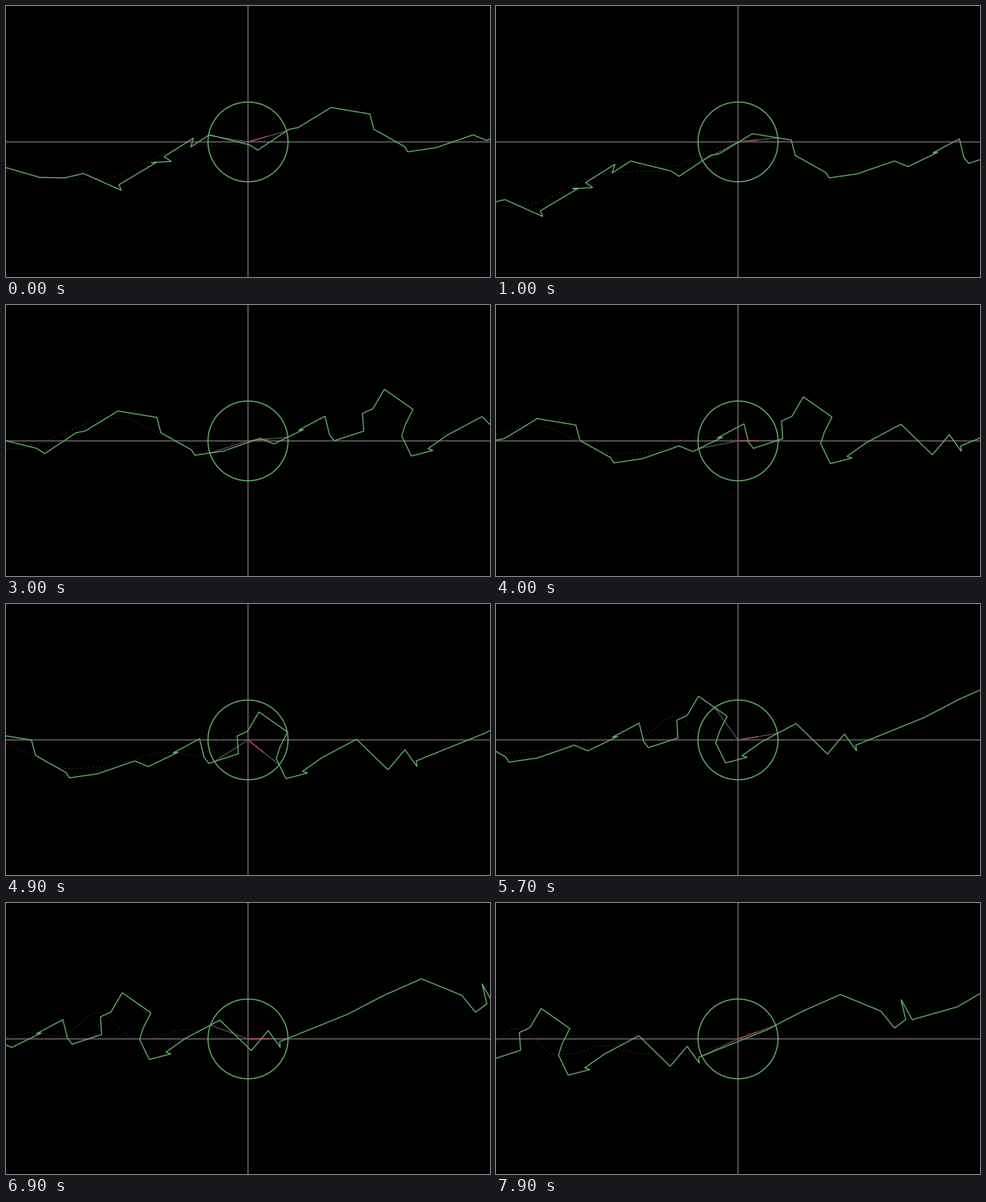
A matplotlib script that plays this animation: 600 by 337 pixels, repeating every 8000 ms.

```python
import numpy as np
import matplotlib.pyplot as plt
from matplotlib.animation import FuncAnimation

W, H, DPI = 600, 337, 100
FRAMES, STEP_MS = 80, 100
DOTS_PER_FRAME, HISTORY = 2, 38
CX, CY, R = 300, 169, 49.6
PX = 72 / DPI
GREEN, AXIS, RAY, RED, DOT = "#66b26c", "#7a747a", "#626262", "#b84c58", "#50303a"

# Corners of the jagged route, in world space
ROUTE = np.array([
    (-30, 192), (42, 213), (73, 213.5), (96, 208), (143, 229), (140, 222),
    (187, 194), (180, 194.5), (205, 193), (196, 187), (232.5, 164), (229, 175),
    (252, 160), (302, 172.5), (312, 179), (351, 153), (362, 151), (403, 126),
    (451, 134), (456, 153), (494, 174.5), (498, 181), (533, 176), (579, 160),
    (596, 167), (633, 149), (626.5, 150), (659.5, 132.5), (665, 155.5),
    (671, 163), (707.5, 151), (706, 129), (719, 123), (733, 99), (768.5, 124),
    (759, 143), (754.5, 157), (766.5, 182), (793.5, 175), (787, 173),
    (811, 156), (854, 133), (893, 171), (914, 146), (929, 167), (928, 160),
    (1013, 125.5), (1057, 102.5), (1104, 81.7), (1154, 102.3), (1171, 123.3),
    (1185, 112.8), (1179, 87.8), (1193, 113), (1249, 97), (1290, 73),
])

# The follower eases from bend to bend
BENDS = np.array([
    (-80, 198), (108, 217), (235, 174), (272, 173.5), (400, 134.8), (498, 170),
    (535, 168), (622, 149.5), (656, 153.9), (702, 124.3), (751, 157),
    (768, 156.3), (809, 145.5), (862, 156.3), (907, 156.5), (1030, 124),
])
# Frame number and the follower's x at that moment
PACE = np.array([(0, 300), (20, 470), (30, 564), (40, 652), (57, 782), (79, 977)])
SPEED = 9.2


def track_y(x):
    bx, by = BENDS.T
    i = np.clip(np.searchsorted(bx, x) - 1, 0, len(bx) - 2)
    t = (x - bx[i]) / (bx[i + 1] - bx[i])
    return by[i] + (by[i + 1] - by[i]) * t * t * (3 - 2 * t)


def follower_positions():
    """Positions at even spacing along the track, history included."""
    xs = np.arange(-80, 1030, 0.5)
    ys = track_y(xs)
    arc = np.append(0, np.cumsum(np.hypot(np.diff(xs), np.diff(ys))))
    n = np.arange(-HISTORY, FRAMES, 1 / DOTS_PER_FRAME)
    s = np.interp(n, PACE[:, 0], np.interp(PACE[:, 1], xs, arc))
    s += SPEED * np.minimum(n, 0)
    return np.column_stack([np.interp(s, arc, xs), np.interp(s, arc, ys)])


def crossings(path):
    """First and last points where the path meets the circle."""
    p, d = path[:-1] - (CX, CY), np.diff(path, axis=0)
    a, b = (d * d).sum(1), (p * d).sum(1)
    disc = b * b - a * ((p * p).sum(1) - R * R)
    root = np.sqrt(np.maximum(disc, 0))
    hits = []
    for sign in (-1, 1):
        t = (-b + sign * root) / a
        for i in np.flatnonzero((disc >= 0) & (t >= 0) & (t <= 1)):
            hits.append((i + t[i], path[i] + t[i] * d[i]))
    hits.sort(key=lambda hit: hit[0])
    return hits[0][1], hits[-1][1]


POS = follower_positions()

fig = plt.figure(figsize=(W / DPI, H / DPI), dpi=DPI, facecolor="black")
ax = fig.add_axes([0, 0, 1, 1])
ax.set_xlim(0, W)
ax.set_ylim(H, 0)
ax.axis("off")


def stroke(color, width, xs=(), ys=()):
    return ax.plot(xs, ys, color=color, lw=width * PX,
                   solid_joinstyle="miter", snap=False)[0]


stroke(AXIS, 1.25, (0, W), (CY, CY))
stroke(AXIS, 1.25, (CX, CX), (0, H))
trail = ax.plot([], [], ls="none", marker=",", color=DOT)[0]
back_ray = stroke(RAY, 1)
front_ray = stroke(RAY, 1)
heading = stroke(RED, 1.2)
route = stroke(GREEN, 1.25)
angle = np.linspace(0, 2 * np.pi, 181)
stroke(GREEN, 1.35, CX + R * np.cos(angle), CY + R * np.sin(angle))


def update(n):
    now = (n + HISTORY) * DOTS_PER_FRAME
    shift = np.array([CX, CY]) - POS[now]
    path = ROUTE + shift
    route.set_data(*path.T)
    trail.set_data(*(POS[:now] + shift).T)
    entry, goal = crossings(path)
    back_ray.set_data((CX, entry[0]), (CY, entry[1]))
    front_ray.set_data((CX, goal[0]), (CY, goal[1]))
    heading.set_data((CX, (CX + goal[0]) / 2), (CY, (CY + goal[1]) / 2))
    return route, trail, back_ray, front_ray, heading


anim = FuncAnimation(fig, update, frames=FRAMES, interval=STEP_MS,
                     repeat=True, repeat_delay=0)
plt.show()
```
